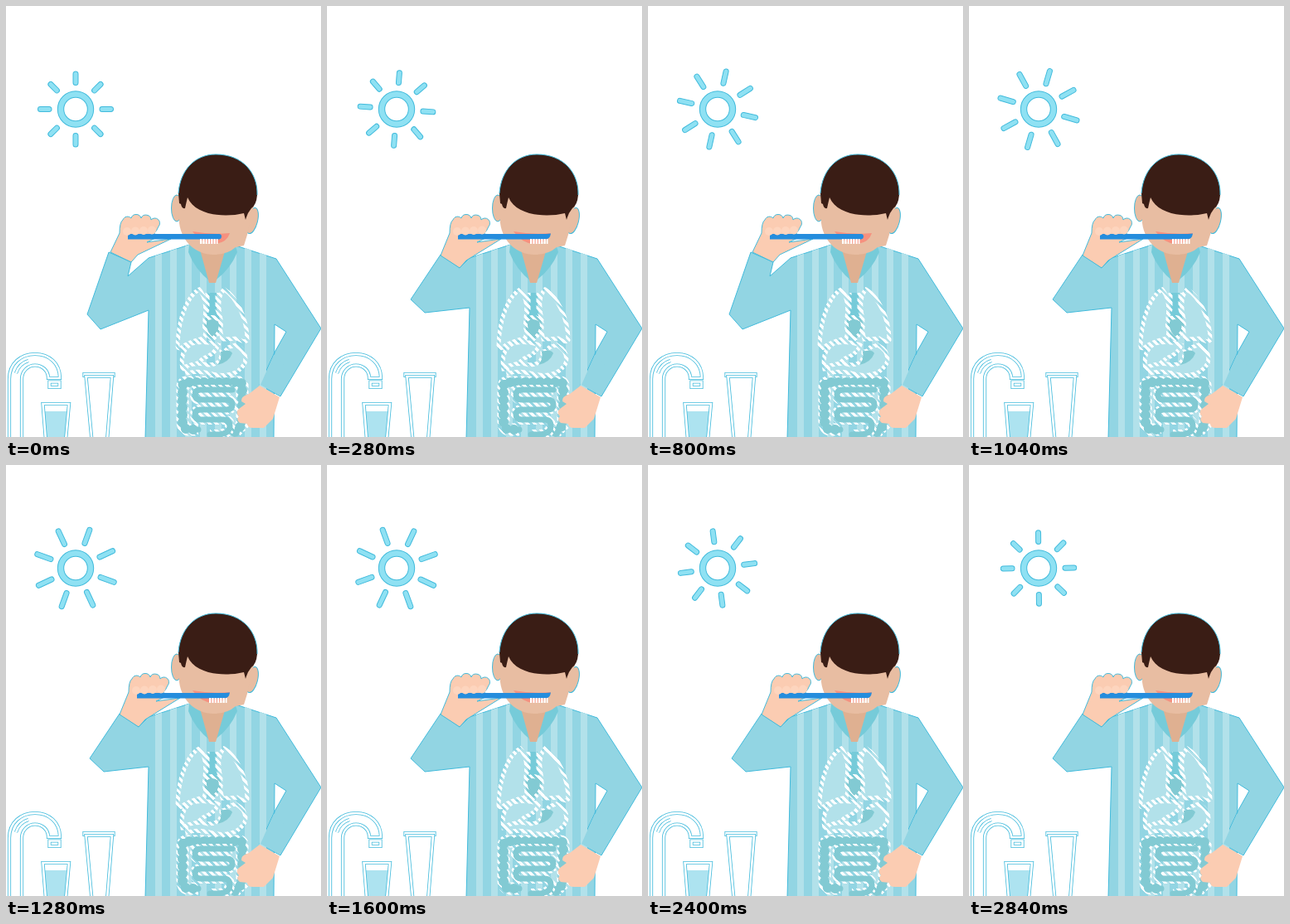
Write an HTML page that moves like this. It is 380x520 px and loops after 2880 ms.

```html
<!DOCTYPE html>
<html lang="en">
<head>
<meta charset="utf-8">
<title>Morning routine</title>
<style>
html, body { margin: 0; width: 100%; height: 100%; overflow: hidden; background: #fff; }
svg { display: block; width: 380px; height: 520px; }
.edge { stroke: #42bbdc; stroke-width: 1; stroke-linejoin: round; }
.line { fill: none; }
.cloth { fill: #92d5e3; }
.light { fill: #b2e1ea; }
.collar { fill: #76cbd9; }
.skin { fill: #fbccb2; }
.face { fill: #e8bda2; }
.teal { fill: #82cad3; }
.candy { fill: none; stroke: url(#stripe); stroke-width: 5; }
.wide { stroke-width: 15; }
.mid { stroke-width: 12; }
.gut { fill: none; stroke: #82cad3; stroke-width: 7; stroke-linejoin: round; stroke-linecap: round; }
.beads { stroke-width: 12; stroke-dasharray: 0 9; }
.rim { fill: none; stroke: #42bbdc; stroke-width: 4.2; }
.core { fill: none; stroke: #fff; stroke-width: 2.6; }
</style>
</head>
<body>
<svg id="stage" viewBox="0 0 380 520"></svg>
<script>
const LOOP = 2880, BRUSH = 360, BACK = 160, STRIPE = 8.4, CYCLES = 6;
const stage = document.getElementById('stage');

const path = (cls, d, extra = '') => `<path class="${cls}" d="${d}" ${extra}/>`;
const tube = d => path('rim', d) + path('core', d);
const organ = (cls, d) => path(cls, d) + path('candy', d);

function defs() {
  const h = STRIPE / 2;
  return `<defs><clipPath id="torso"><path d="M168 522L172 304L221 288H277L324 304V522Z"/></clipPath>
    <linearGradient id="stripe" gradientUnits="userSpaceOnUse" spreadMethod="repeat" x1="0" y1="0" x2="${h}" y2="${-h}">
    <stop offset=".5" stop-color="#fff"/><stop offset=".55" stop-color="#fff" stop-opacity="0"/>
    <stop offset=".95" stop-color="#fff" stop-opacity="0"/><stop offset="1" stop-color="#fff"/>
    </linearGradient></defs>`;
}

function sun() {
  let rays = '';
  for (let a = 0; a < 360; a += 45)
    rays += `<rect class="edge ray" x="-3" width="6" rx="3" fill="#8fe1f3" transform="rotate(${a})"/>`;
  return `<g transform="translate(84 124.5)"><g id="rays">${rays}</g>
    <circle r="18" fill="none" stroke="#42bbdc" stroke-width="8.4"/>
    <circle r="18" fill="none" stroke="#8fe1f3" stroke-width="6.4"/></g>`;
}

function sink() {
  return tube('M4 524V450C4 431 18 420 35 420S65 431 65 449H51C51 440 44 433.5 35 433.5S19 441 19 450V524') +
    tube('M12 443C15 434 20 430 27 428') +
    tube('M52.5 453.5H64.5V460H52.500Z') +
    path('', 'M46 489H74.500L72 520H49Z', 'fill="#ade3f0"') +
    tube('M44.500 480H76L72 524H48Z') +
    tube('M94.500 444H129.500V446H94.500Z') +
    tube('M96.500 447H128L122 524H103.500Z');
}

// Shirt outline with the raised arm's points inserted.
function shirt(id, arm) {
  return path('cloth edge', `M168 522L172 ${arm} L172 304L221 288L277 289L326 305L380 389L331 471L306 457L324 418L338 393L324 384L323 522Z`, `id="${id}"`);
}

// tip: the end of the brush head.
function hand(id, dx, y1, x2, y2, tip) {
  let fingers = '';
  for (let i = 0; i < 4; i++)
    fingers += `<ellipse cx="${146 + i * 10}" cy="${272 - i * .5}" rx="5" ry="5" fill="#fdd5be"/>`;
  return `<g id="${id}" transform="translate(${dx} 0)">` +
    path('skin edge', `M126 ${y1}L137 274Q137 261 141 258A6 6 0 0 1 151 256A6.2 6 0 0 1 163 256A6.2 6 0 0 1 175 258A6 6 0 0 1 184 266Q182 271 179 274L182 279L170 285L199 281L${x2 + 8} ${y2 - 9}L${x2} ${y2}Z`) +
    path('', `M147 275H${tip}H147Z`, 'fill="#258ddd"') +
    path('', 'M234 284H255.500', 'stroke="#fff" stroke-width="6" stroke-dasharray="2.300 1"') +
    fingers + '</g>';
}

function stripes() {
  let bars = '';
  for (let x = 180; x < 320; x += 18)
    bars += `<rect class="light" x="${x}" y="288" width="8" height="234"/>`;
  return `<g clip-path="url(#torso)">${bars}</g>` +
    path('cloth', 'M323 421L307 457L330 470L345 446L325 420Z');
}

function head() {
  return path('collar', 'M221 288L220 297Q228 318 246 332L240 296Z') +
    path('collar', 'M277 289L279 297Q270 319 251 332L260 296Z') +
    path('', 'M234 294L245 334H253L264 296Z', 'fill="#dfb091"') +
    '<ellipse class="face edge" cx="206" cy="244" rx="6.5" ry="16"/>' +
    '<ellipse class="face edge" cx="297" cy="259" rx="6.5" ry="16" transform="rotate(14 297 259)"/>' +
    path('face', 'M208 226L209 262C212 285 230 300 250 300Q267 300 277 291L287 289L291 276L300 236Z') +
    path('', 'M209 238L208 226C210 198 228 179 253 179C286 179 304 202 303 228Q302 240 296 244Q291 250 289 258L287 250C262 256 228 252 219 231Q217 239 216 244Q212 245 211 239Z', 'fill="#3a1d15"') +
    path('edge line', 'M208 226C210 198 228 179 253 179C286 179 304 202 303 228') +
    path('', 'M225 272Q247 276 270 274Q266 287 249 287Q235 286 225 272Z', 'fill="#f6917f"');
}

function organs() {
  const colon = 'M276 514L285 505V458Q285 454 281 454H218Q213 454 213 460V501Q213 511 221 511H232';
  const bowel = 'M273 463H235Q228 463 228 469T235 475H266Q273 475 273 481T266 487H235Q228 487 228 493T235 499H262Q270 499 270 507T258 517H246';
  return path('collar', 'M244 346H254V366L258 378H240L244 366Z') +
    path('candy', 'M243 346V366L239 377M255 346V366L259 377') +
    organ('light', 'M233 342C221 348 208 373 207 410Q208 416 216 409Q228 403 239 401Q243 390 240 376Q243 353 233 342Z') +
    organ('light', 'M263 342C277 350 291 376 291 403Q288 407 279 401Q270 402 261 402Q257 390 259 378Q253 352 263 342Z') +
    organ('teal', 'M240 379Q248 372 258 379Q263 391 249 402Q237 394 240 379Z') +
    organ('light', 'M213 438Q209 416 224 407Q240 403 256 409Q252 420 238 425Q224 438 213 438Z') +
    organ('light', 'M277 409Q292 417 288 431Q277 450 249 444Q231 439 219 443L216 435Q231 429 244 433Q261 433 260 417Q266 417 268 412Z') +
    path('teal', 'M259 417Q270 413 273 419Q269 430 255 433Q261 426 259 417Z') +
    path('candy wide', colon) + path('gut', colon) + path('gut beads', colon) +
    path('candy mid', bowel) + path('gut', bowel);
}

function restHand() {
  return path('skin', 'M306 458L330 472L322 498L311 509H298Q291 509 291 504L282 503Q277 499 281 495Q276 490 281 486L289 480L284 477Q283 471 293 468Z');
}

stage.innerHTML = defs() + sun() + sink() +
  shirt('armBack', '367L114 390L98 372L124 297L151 309L147 326') +
  shirt('armFront', '364L118 370L101 354L137 300L160 316') +
  stripes() + organs() + restHand() + head() +
  hand('handBack', 0, 297, 151, 309, '257Q260 275 260 278T257 281.500') +
  hand('handFront', 11, 301, 149, 316, '253L259 274.500Q258 281.500 252 281.500');

const byId = id => document.getElementById(id);
const raysGroup = byId('rays'), stripe = byId('stripe');
const rays = stage.querySelectorAll('.ray');
const back = [byId('armBack'), byId('handBack')];
const front = [byId('armFront'), byId('handFront')];
const show = (parts, on) => parts.forEach(p => p.setAttribute('display', on ? 'inline' : 'none'));

function draw(ms) {
  const t = ms % LOOP, k = t / LOOP;
  const isBack = t % BRUSH < BACK;
  const grow = 7.5 * (1 - Math.abs(2 * k - 1));
  raysGroup.setAttribute('transform', `rotate(${45 * k})`);
  rays.forEach(r => {
    r.setAttribute('y', -45.5 - grow);
    r.setAttribute('height', 16.5 + grow);
  });
  show(back, isBack);
  show(front, !isBack);
  stripe.setAttribute('gradientTransform', `translate(${k * CYCLES * STRIPE} 0)`);
}

const start = performance.now();
function tick() {
  draw(performance.now() - start);
  requestAnimationFrame(tick);
}
draw(0);
requestAnimationFrame(tick);
</script>
</body>
</html>
```
